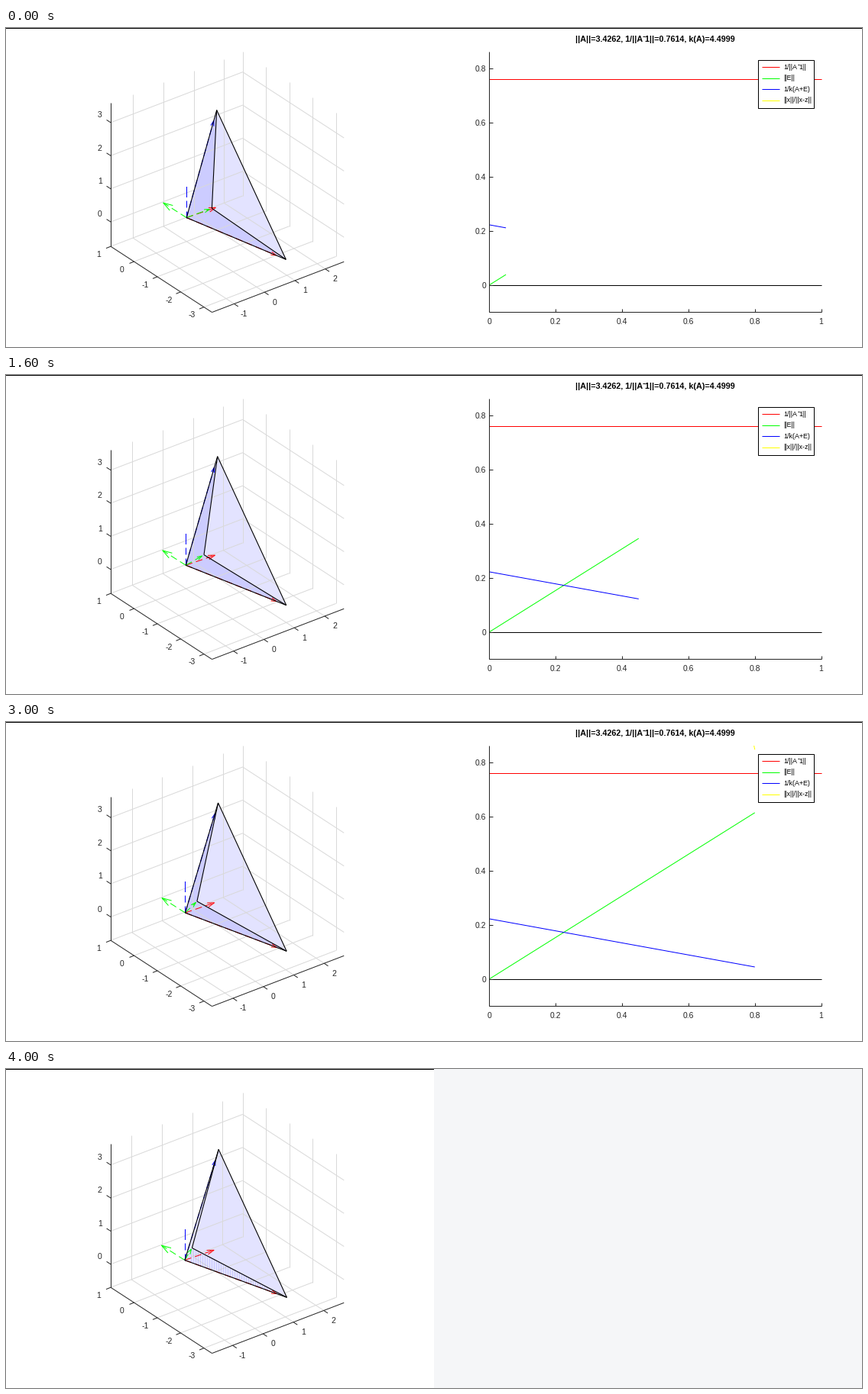
A matplotlib script that plays this animation: 1120x418 px, repeating every 4200 ms.

```python
import numpy as np
import matplotlib.pyplot as plt
from matplotlib.animation import FuncAnimation
from matplotlib.patches import Polygon, Rectangle

W, H, DPI = 1120, 418, 64
PX = 72 / DPI                     # points per pixel
FRAMES, INTERVAL = 21, 200

INK = "#262626"
GRID = "#d9d9d9"
RED, GREEN, BLUE, YELLOW = "#ff0000", "#00ff00", "#0000ff", "#ffff00"

# Orthographic view: azimuth -37.5, elevation 30
SCALE = 50.1
AZ, EL = np.radians(37.5), np.radians(30)
UX = SCALE * np.array([np.cos(AZ), -np.sin(AZ) * np.sin(EL)])
UY = SCALE * np.array([-np.sin(AZ), -np.cos(AZ) * np.sin(EL)])
UZ = SCALE * np.array([0, -np.cos(EL)])
SPAN = 4.345
Y_MAX = 1.0
CORNER = np.array([137.0, 286.2])

# Plot area on the right
X0, X_UNIT = 632.4, 434.2
Y0, Y_UNIT = 336.75, 354.7
NORM_INV = 0.7614
E_RATE = 0.768
INV_COND = 1 / 4.4999
TOP, BOTTOM = 31, 372

fig = plt.figure(figsize=(W / DPI, H / DPI), dpi=DPI, facecolor="white")
ax = fig.add_axes([0, 0, 1, 1])


def line(points, color=INK, width=1.0, **kw):
    xs, ys = zip(*points)
    return ax.plot(xs, ys, color=color, lw=width * PX,
                   solid_capstyle="butt", dash_capstyle="butt", **kw)[0]


def path(points, color):
    """Separate segments, so that upright ones fall on whole pixels."""
    for a, b in zip(points, points[1:]):
        line([a, b], color)


def label(x, y, text, size=10.4, ha="center", color=INK, **kw):
    """Text whose digits are centred on y."""
    ax.text(x, y + 0.36 * size, text, fontsize=size * PX, ha=ha,
            va="baseline", color=color, family="Liberation Sans", **kw)


def mix(a, b, t):
    return (1 - t) * np.array(a, float) + t * np.array(b, float)


def arrow(start, tip, color, head=9.5, spread=0.3):
    start, tip = np.array(start), np.array(tip)
    line([start, tip], color, linestyle=(0, (9, 5)))
    back = np.arctan2(*(start - tip)[::-1])
    wings = [tip + head * np.array([np.cos(back + s), np.sin(back + s)])
             for s in (-spread, spread)]
    line([wings[0], tip, wings[1]], color)


def face(points, alpha):
    ax.add_patch(Polygon(points, closed=True, fc=BLUE, ec="none", alpha=alpha))


def stripes(points):
    """Fine vertical hatching where two faces fall together."""
    tri = Polygon(points, closed=True, fc="none", ec="none")
    ax.add_patch(tri)
    xs, ys = zip(*points)
    for x in np.arange(min(xs) + 8, max(xs) - 25, 3):
        bar = line([(x, min(ys)), (x, max(ys))], BLUE, alpha=0.11)
        bar.set_clip_path(tri)


def draw_box(t):
    x_min = -1.73 + 0.05 * t
    z_min = -0.74 + 0.04 * t

    def at(x, y, z):
        return CORNER + (x - x_min) * UX + (y - Y_MAX) * UY + (z - z_min) * UZ

    x_max, y_min, z_max = x_min + SPAN, Y_MAX - SPAN, z_min + SPAN
    x_ticks, y_ticks, z_ticks = range(-1, 3), range(-3, 2), range(0, 4)

    for x in x_ticks:
        path([at(x, y_min, z_min), at(x, Y_MAX, z_min), at(x, Y_MAX, z_max)],
             GRID)
    for y in y_ticks:
        path([at(x_min, y, z_min), at(x_max, y, z_min), at(x_max, y, z_max)],
             GRID)
    for z in z_ticks:
        path([at(x_min, Y_MAX, z), at(x_max, Y_MAX, z), at(x_max, y_min, z)],
             GRID)

    path([at(x_min, Y_MAX, z_max), at(x_min, Y_MAX, z_min),
          at(x_min, y_min, z_min), at(x_max, y_min, z_min)], INK)

    def tick(p, step, offset, value):
        line([p, p + step])
        label(p[0] + offset[0], p[1] + offset[1], str(value))

    for x in x_ticks:
        tick(at(x, y_min, z_min), (5.2, 3.5), (13, 12.6), x)
    for y in y_ticks:
        tick(at(x_min, y, z_min), (-6, 2.4), (-15.5, 10), y)
    for z in z_ticks:
        tick(at(x_min, Y_MAX, z), (-5.4, -3.5), (-14.3, -10.5), z)


def draw_solid(t):
    o = mix((236.2, 248.5), (233.9, 250.5), t)
    p = mix((366.3, 303.3), (367.4, 299.3), t)
    q = mix((275.7, 107.6), (278.2, 105.4), t)
    r = mix((269.4, 236.3), (243.4, 234.5), t)

    arrow(o, o + (38.2, -13.2), RED)
    arrow(o, o + (-30.4, -19.4), GREEN, head=13)
    arrow(o, o + (0, -41), BLUE, head=13, spread=0)
    for end, color in ((p, RED), (r, GREEN), (q, BLUE)):
        arrow(o, o + 0.9 * (end - o), color, head=7)

    flat = t >= 1
    face([q, r, p], 0.11)
    for tri in ([o, q, r], [o, p, r]):
        face(tri, 0.11 if flat else 0.2)
    if flat:
        stripes([o, p, r])

    for a, b in ((o, p), (o, q), (p, q), (p, r), (q, r)):
        line([a, b], "black", 1.1)


def draw_legend():
    ax.add_patch(Rectangle((984, 42), 73, 63, fc="white", ec="black",
                           lw=PX, zorder=5))
    rows = ((RED, None), (GREEN, "||E||"), (BLUE, "1/k(A+E)"),
            (YELLOW, "||x||/||x-z||"))
    for k, (color, text) in enumerate(rows):
        y = 51 + 14.6 * k
        line([(989, y), (1012, y)], color, zorder=6)
        style = dict(size=8.9, color="black", zorder=6)
        if text:
            label(1017, y - 0.6, text, ha="left", **style)
        else:
            label(1017, y - 0.6, "1/||A", ha="left", **style)
            label(1047, y - 0.6, "1||", ha="right", **style)
            line([(1036, y - 3), (1038, y - 3)], "black", zorder=6)


def draw_plot(end):
    def at(x, y):
        return X0 + X_UNIT * x, Y0 - Y_UNIT * y

    bold = dict(size=10.7, color="black", weight="bold")
    label(745, 14.2, "||A||=3.4262, 1/||A", ha="left", **bold)
    line([(833, 11), (836, 11)], "black")
    label(954, 14.2, "1||=0.7614, k(A)=4.4999", ha="right", **bold)

    line([at(0, 0), at(1, 0)], "black")
    line([at(0, NORM_INV), at(1, NORM_INV)], RED)
    line([at(0, 0), at(end, E_RATE * end)], GREEN)
    line([at(0, INV_COND), at(end, INV_COND * (1 - end))], BLUE)

    ts = np.arange(0.05, end + 0.01, 0.05)
    curve = line([at(s, 3.39 * (1 - s) / s) for s in ts], YELLOW)
    curve.set_clip_path(Rectangle((X0, TOP), X_UNIT, BOTTOM - TOP,
                                  transform=ax.transData))

    path([(X0, TOP), (X0, BOTTOM), (X0 + X_UNIT, BOTTOM)], INK)
    for k in range(6):
        x = at(k / 5, 0)[0]
        line([(x, BOTTOM), (x, BOTTOM - 4.5)])
        label(x, 384.5, f"{k / 5:g}")
    for k in range(5):
        y = at(0, k / 5)[1]
        line([(X0, y), (X0 + 4.5, y)])
        label(628, y + 0.3, f"{k / 5:g}", ha="right")

    draw_legend()


def draw(i):
    ax.cla()
    ax.set_xlim(0, W)
    ax.set_ylim(H, 0)
    ax.axis("off")

    draw_box(i / 20)
    draw_solid(i / 20)

    last = i == FRAMES - 1
    if last:
        ax.add_patch(Rectangle((W / 2, 0), W / 2, H, fc="#f5f6f8", ec="none"))
    else:
        draw_plot((i + 1) / 20)
    ax.add_patch(Rectangle((0, 0), W / 2 if last else W, 1,
                           fc="black", ec="none"))
    return []


anim = FuncAnimation(fig, draw, frames=FRAMES, interval=INTERVAL,
                     repeat=True, repeat_delay=0)
plt.show()
```
